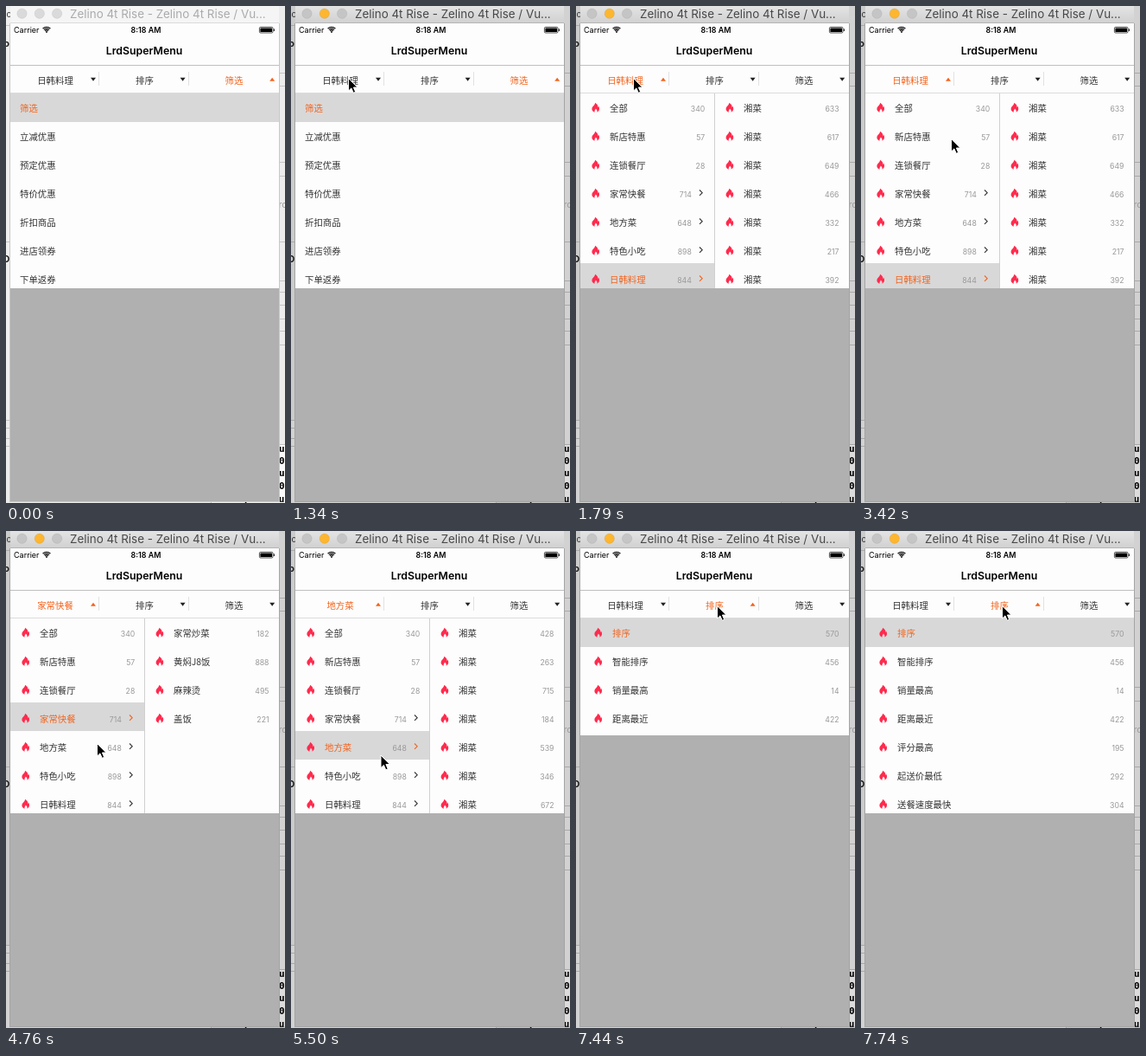
Write an HTML page that moves like this. It is 323x574 px and loops after 8000 ms.

```html
<!DOCTYPE html>
<html lang="zh-CN">
<head>
<meta charset="utf-8">
<title>LrdSuperMenu</title>
<style>
html, body { margin: 0; width: 100%; height: 100%; overflow: hidden; background: #ececec; }
svg { display: block; width: 323px; height: 574px; font-family: Inter, 'Liberation Sans', sans-serif; }
.cjk { font: 10.4px 'Noto Sans CJK SC', 'Noto Sans CJK', sans-serif; }
.count { font-size: 8.7px; fill: #999; text-anchor: end; }
.mono { font: bold 11px 'DejaVu Sans Mono', monospace; }
.mid { text-anchor: middle; }
</style>
</head>
<body>
<svg id="stage" viewBox="0 0 323 574">
  <defs>
    <clipPath id="reveal"><rect id="open" x="5" y="101" width="311" height="225"/></clipPath>
    <linearGradient id="bar" x2="0" y2="1">
      <stop stop-color="#e4e4e4"/><stop offset="1" stop-color="#d0d0d0"/>
    </linearGradient>
  </defs>
  <g id="desk"></g>
  <g id="chrome"></g>
  <g id="screen"></g>
  <g id="tabs"></g>
  <g id="list" clip-path="url(#reveal)"></g>
  <path id="cursor" d="M0 0V14.5L3.4 11.4L5.8 16.8L8.2 15.8L5.9 10.5H10.4Z" fill="#000" stroke="#fff" stroke-width="1"/>
</svg>
<script>
const LOOP = 8000, ORANGE = '#f4631c', INK = '#333', ROW = 33, TOP = 101;
const $ = id => document.getElementById(id);

const rect = (x, y, w, h, fill) => `<rect x="${x}" y="${y}" width="${w}" height="${h}" fill="${fill}"/>`;
const text = (s, x, y, fill, cls = '', size = '', weight = '') =>
  `<text x="${x}" y="${y}" fill="${fill}" class="${cls}" ${size && `font-size="${size}"`} ${weight && `font-weight="${weight}"`}>${s}</text>`;
const path = (d, attrs) => `<path d="${d}" ${attrs}/>`;

const FLAME = 'M4.2 0C7 2 7.8 3.4 7.2 5.2C7.9 4.9 8.1 4.3 8 3.8C9.7 6 9.5 9.6 6.4 11C7 9.4 6.3 8 4.8 6.7C4.6 8.2 2.9 9 3.6 11C.3 9.8-.4 6.7 1.4 4.5C2.6 3 4 2 4.2 0Z';
const flame = (x, y) => path(FLAME, `transform="translate(${x} ${y})" fill="#ff2b4e"`);

// Rows of [name, count, hasChevron]
const filters = ['筛选', '立减优惠', '预定优惠', '特价优惠', '折扣商品', '进店领券', '下单返券'].map(n => [n]);
const sorts = [['排序', 570], ['智能排序', 456], ['销量最高', 14], ['距离最近', 422],
  ['评分最高', 195], ['起送价最低', 292], ['送餐速度最快', 304]];
const kinds = [['全部', 340], ['新店特惠', 57], ['连锁餐厅', 28], ['家常快餐', 714, 1],
  ['地方菜', 648, 1], ['特色小吃', 898, 1], ['日韩料理', 844, 1]];
const xiang = (...counts) => counts.map(n => ['湘菜', n]);
const homeStyle = [['家常炒菜', 182], ['黄焖J8饭', 888], ['麻辣烫', 495], ['盖饭', 221]];

const states = [
  { at: 0, tab: 2, title: '日韩料理' },
  { at: 1640, tab: 0, pick: 6, sub: xiang(633, 617, 649, 466, 332, 217, 392) },
  { at: 4170, tab: 0, pick: 3, sub: homeStyle },
  { at: 5060, tab: 0, pick: 4, sub: xiang(428, 263, 715, 184, 539, 346, 672) },
  { at: 6390, tab: 0, pick: 6, sub: xiang(165, 799, 150, 192, 714, 801, 367) },
  { at: 7440, tab: 1, title: '日韩料理' }
];

// [time, x, y] of the pointer tip
const moves = [
  [600, 201, 239.5], [890, 85, 100.5], [1190, 70, 88], [1340, 66.5, 83.5],
  [2230, 69, 88], [2380, 76, 100], [2530, 86, 118], [2680, 95, 134], [2820, 101, 145], [2970, 104, 149.5],
  [3420, 104.5, 153.5], [3570, 107, 184], [3720, 106, 212.5],
  [4610, 106, 231], [4760, 105.5, 245.5],
  [5350, 105, 249], [5500, 104, 259], [5650, 102, 273], [5800, 100, 288], [5950, 98, 300], [6090, 96.5, 306.5],
  [6540, 100, 290], [6690, 114, 236], [6840, 135, 165], [6990, 154, 108], [7140, 163.5, 86.5]
];

// Short steps where a part is still settling: [from, to, value]
const opening = [[1640, 1790, .6], [7440, 7590, .6]];
const nudges = [[5060, 5200, -1.5], [6390, 6540, 1.5]];

const last = (table, t, key) => table.reduce((found, e) => key(e) <= t ? e : found, null);
const within = (table, t, rest) => (table.find(([a, b]) => t >= a && t < b) || [0, 0, rest])[2];

function drawDesk(active) {
  const line = active ? '#a9a9a9' : '#c4c4c4';
  const rules = (x, w, ys) => ys.map(y => rect(x, y, w, 1, line)).join('');
  $('desk').innerHTML =
    rect(0, 0, 323, 574, active ? '#d2d2d2' : '#ececec') +
    rect(0, 0, 5, 478, active ? '#cbcbcb' : '#efefef') +
    rect(316, 506, 7, 68, active ? '#dcdcdc' : '#fafafa') +
    rect(238, 572, 85, 2, active ? '#c4c4c4' : '#f2f2f2') +
    rules(0, 5, [22, 272, 478, 487, 499, 508]) +
    rules(316, 7, [77, 92, 180, 196, 272, 317, 330, 345, 361, 375, 391, 506]) +
    rect(237, 571, 1, 3, line) +
    text('ic', -2, 13, '#333', '', 10) + text('lo', -5, 47, '#111', '', 10, 700) +
    text('D', -3, 296, '#111', '', 10, 700) + text('rc', 315.5, 233, '#999', '', 10.5) +
    ['u', '0', 'u', '0'].map((c, i) => text(c, 316, 515 + i * 14.2, '#000', 'mono')).join('') +
    text('LrdSuperMenu', 243, 573, '#000', 'mono');

  const dots = active ? ['#c5c5c5', '#fdb62f', '#c5c5c5'] : ['#dadada', '#dadada', '#dadada'];
  $('chrome').innerHTML =
    rect(4, 20, 313, 553, active ? '#a4a4a4' : '#c8c8c8') +
    rect(5, 0, 311, 20, active ? 'url(#bar)' : '#f5f5f5') +
    rect(5, 19, 311, 1, active ? '#b5b5b5' : '#dadada') +
    dots.map((c, i) => `<circle cx="${18.5 + i * 20.3}" cy="8.7" r="5.7" fill="${c}" stroke="#000" stroke-opacity=".1" stroke-width=".6"/>`).join('') +
    text('Zelino 4t Rise - Zelino 4t Rise / Vu...', 74, 14, active ? '#484848' : '#ababab', '', 13.4);
}

function drawScreen() {
  const arc = r => `M${47 - r * .72} ${30.6 - r * .72}A${r} ${r} 0 0 1 ${47 + r * .72} ${30.6 - r * .72}`;
  $('screen').innerHTML =
    rect(5, 20, 311, 81, '#fdfdfd') + rect(5, 101, 311, 471, '#b0b0b0') +
    rect(5, 68, 311, 1, '#c0c0c0') + rect(5, 100, 311, 1, '#dcdcdc') +
    text('Carrier', 9, 31, '#000', '', 9) +
    path([2.6, 4.4, 6.2].map(arc).join(''), 'fill="none" stroke="#000" stroke-width="1.2"') +
    '<circle cx="47" cy="30" r=".9"/>' +
    text('8:18 AM', 162, 31, '#000', 'mid', 8.9, 600) +
    '<rect x="293.4" y="24.4" width="15.6" height="6.6" rx="1.3" fill="none" stroke="#000" stroke-width=".7"/>' +
    '<rect x="294.4" y="25.4" width="13.6" height="4.6" rx=".5"/>' + rect(309.8, 26.4, 1, 2.6, '#000') +
    text('LrdSuperMenu', 160, 56.3, '#000', 'mid', 12.3, 600) +
    rect(107, 76, 1, 16, '#e2e2e2') + rect(211, 76, 1, 16, '#e2e2e2');
}

function drawTabs(state, shift) {
  const names = [state.title || kinds[state.pick][0], '排序', '筛选'];
  $('tabs').innerHTML = names.map((name, i) => {
    const on = i === state.tab, x = 101 + i * 103.6;
    const tri = on ? `M${x - 3} 86.8h6l-3-4z` : `M${x - 3} 82.8h6l-3 4z`;
    return text(name, 57 + i * 103.5 + (i ? 0 : shift), 89.8, on ? ORANGE : INK, 'cjk mid') +
      path(tri, `fill="${on ? ORANGE : '#222'}"`);
  }).join('');
}

function rows(items, { x, w, pick, icon, label, right }) {
  return rect(x, TOP, w, 225, '#fdfdfd') + items.map(([name, count, more], i) => {
    const y = TOP + i * ROW, on = i === pick, mid = y + 16.5, color = on ? ORANGE : INK;
    return (on ? rect(x, i ? y - 2 : y, w, ROW, '#d8d8d8') : '') +
      (icon ? flame(icon, mid - 5.8) : '') +
      text(name, label, mid + 4.3, color, 'cjk') +
      (count === undefined ? '' : text(count, more ? right - 15.5 : right, mid + 4, '#999', 'count')) +
      (more ? path(`M143 ${mid - 4}l3.2 3.2l-3.2 3.2`, `fill="none" stroke="${color}" stroke-width="1.1"`) : '');
  }).join('');
}

function drawList({ tab, pick, sub }) {
  $('list').innerHTML =
    tab === 2 ? rows(filters, { x: 5, w: 311, pick: 0, label: 16 }) :
    tab === 1 ? rows(sorts, { x: 5, w: 311, pick: 0, icon: 21, label: 42, right: 304.5 }) :
    rows(kinds, { x: 5, w: 155.5, pick, icon: 18, label: 39, right: 149.3 }) +
    rows(sub, { x: 160.5, w: 155.5, icon: 173.2, label: 194, right: 304.5 }) +
    rect(160, TOP, 1, 225, '#d0d0d0');
}

const shown = {};
function update(key, value, draw) {
  if (shown[key] === value) return;
  shown[key] = value;
  draw();
}

function render(t) {
  const state = last(states, t, s => s.at);
  const shift = within(nudges, t, 0);
  const spot = last(moves, t, m => m[0]);
  update('active', t >= 150, () => drawDesk(t >= 150));
  update('tabs', state.at + ':' + shift, () => drawTabs(state, shift));
  update('list', state.at, () => drawList(state));
  $('open').setAttribute('height', 225 * within(opening, t, 1));
  $('cursor').setAttribute('visibility', spot ? 'visible' : 'hidden');
  if (spot) $('cursor').setAttribute('transform', `translate(${spot[1]} ${spot[2]})`);
}

drawScreen();
const start = performance.now();
function tick() {
  render((performance.now() - start) % LOOP);
  requestAnimationFrame(tick);
}
tick();
</script>
</body>
</html>
```
